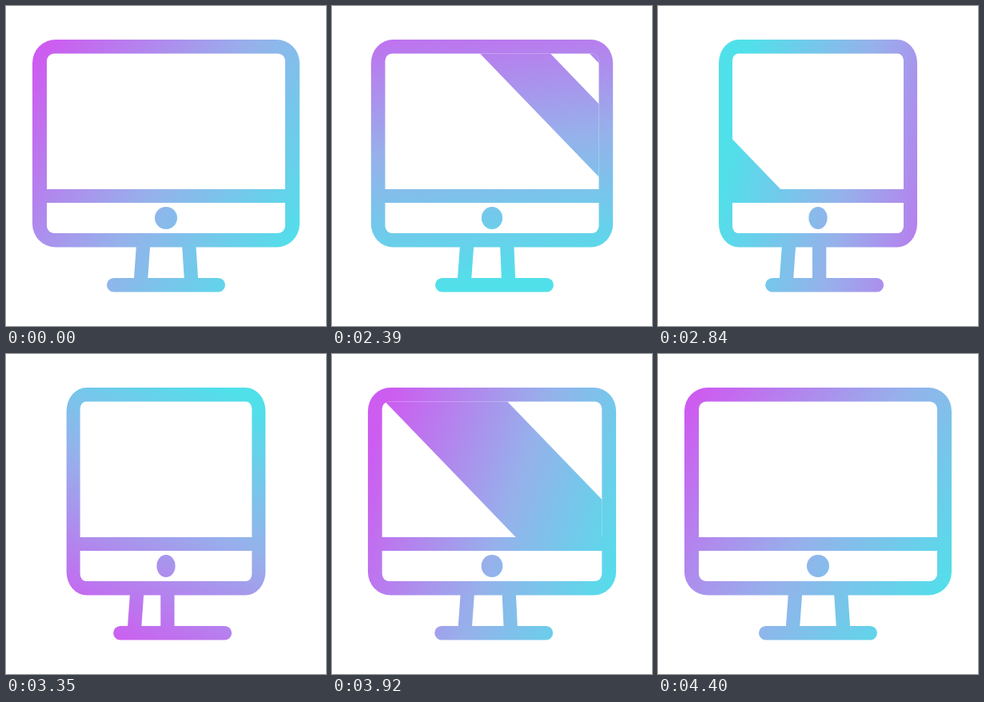
These frames come from a looping animation (400 px wide and 400 px high, 4430 ms). An HTML page:

```html
<!DOCTYPE html>
<html lang="en">
<head>
<meta charset="utf-8">
<title>Turning monitor</title>
<style>
  html, body { margin: 0; width: 100%; height: 100%; overflow: hidden; background: #fff; }
  svg { display: block; width: 100%; height: 100%; }
</style>
</head>
<body>
<svg viewBox="0 0 400 400">
  <defs>
    <linearGradient id="ink" gradientUnits="userSpaceOnUse">
      <stop offset="0" stop-color="#cd5cf0"/>
      <stop offset=".53" stop-color="#96b1eb"/>
      <stop offset="1" stop-color="#50e0ea"/>
    </linearGradient>
    <clipPath id="screen"><rect id="glass" y="59.5" height="224.5" ry="9"/></clipPath>
  </defs>
  <rect width="400" height="400" fill="#fff"/>
  <g fill="url(#ink)">
    <path id="legs"/>
    <rect id="base" y="340" width="148" height="17.5" rx="8.75"/>
    <rect id="frame" y="42" height="259.5" ry="29"/>
    <rect id="inside" y="59.5" height="224.5" ry="9" fill="#fff"/>
    <path id="shine" clip-path="url(#screen)"/>
    <rect id="bar" y="229" height="17"/>
    <ellipse id="dot" cx="200" cy="265" ry="14"/>
  </g>
</svg>
<script>
const LOOP = 4430;
const $ = id => document.getElementById(id);
const set = (id, attrs) => {
  for (const k in attrs) $(id).setAttribute(k, attrs[k]);
};
const clamp = x => Math.max(0, Math.min(1, x));
const ease = x => x < .5 ? 4 * x ** 3 : 1 - 4 * (1 - x) ** 3;

// time, angle in degrees, distances of both gradient ends from the centre
const keys = [
  [2030, 34, -208, 192],
  [2600, 129, -229, 115],
  [2840, 191, -213, 115],
  [3680, 360, -155, 205],
  [3920, 379, -170, 185],
  [4400, 394, -208, 192]
];

function slope(i, c) {
  const a = keys[i - 1], b = keys[i + 1];
  return a && b ? (b[c] - a[c]) / (b[0] - a[0]) : 0;
}

function track(t, c) {
  const last = keys.length - 1;
  if (t <= keys[0][0]) return keys[0][c];
  if (t >= keys[last][0]) return keys[last][c];
  const i = keys.findIndex(k => k[0] > t) - 1;
  const a = keys[i], b = keys[i + 1], d = b[0] - a[0], x = (t - a[0]) / d;
  const h = x * x * (3 - 2 * x);
  return a[c] + (b[c] - a[c]) * h
    + d * slope(i, c) * x * (1 - x) ** 2
    - d * slope(i + 1, c) * x * x * (1 - x);
}

// slanted stripe; l and r are its edges along the top of the screen
const stripe = (l, r) => `M${l} 59H${r}L${r + 164} 229H${l + 164}Z`;

function shine(t) {
  if (t > 2030 && t < 3100) {
    const x = (2600 - t) * .883;
    return stripe(x, x + 88) + stripe(x + 137, x + 202);
  }
  if (t > 3400 && t < 4390) {
    const x = 65 + (t - 3920) * .758;
    return stripe(x, x + 153);
  }
  return '';
}

function span(id, half, rx) {
  set(id, { x: 200 - half, width: 2 * half, rx });
}

function draw(t) {
  const turn = ease(clamp((t - 2030) / 800)) - ease(clamp((t - 3190) / 1240));
  const inner = 149 - 42 * turn;

  span('frame', 167 - 43 * turn, 29 - 4 * turn);
  span('inside', inner, 9 - 2 * turn);
  span('glass', inner, 9 - 2 * turn);
  span('bar', inner + 4, 0);
  set('dot', { rx: 14 - 2.4 * turn });
  set('base', { x: 126 + 8.2 * turn });

  const left = 163 - 8 * turn, top = 220 - 27 * turn, foot = 223 - 30 * turn;
  const leg = (a, b) => `M${a} 298H${a + 17.3}L${b + 17.3} 344H${b}Z`;
  set('legs', { d: leg(left, left - 3.3) + leg(top, foot) });
  set('shine', { d: shine(t) });

  const a = track(t, 1) * Math.PI / 180, s = track(t, 2), e = track(t, 3);
  const c = Math.cos(a), n = Math.sin(a);
  set('ink', { x1: 200 + s * c, y1: 200 + s * n, x2: 200 + e * c, y2: 200 + e * n });
}

function tick() {
  draw(performance.now() % LOOP);
  requestAnimationFrame(tick);
}
tick();
</script>
</body>
</html>
```
